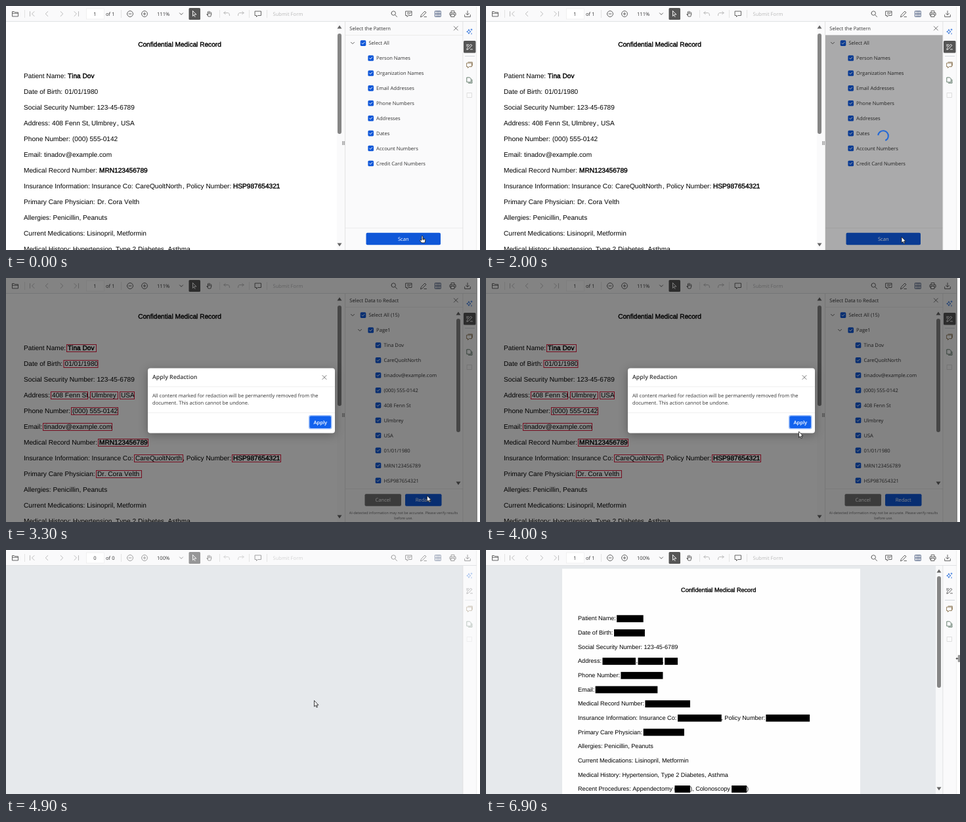
Animation, 722 px wide and 372 px high, one loop 7.8 s. Source, as an HTML page:

```html
<!DOCTYPE html>
<html lang="en">
<head>
<meta charset="utf-8">
<title>Smart redaction</title>
<style>
  html, body { margin: 0; width: 100%; height: 100%; overflow: hidden; background: #fff; }
  svg { display: block; }
  text { font-family: "Open Sans", "Noto Sans", sans-serif; font-size: 7.6px; fill: #333; text-rendering: geometricPrecision; }
  .doc text { font-family: "Liberation Sans", Arial, sans-serif; font-size: 10.15px; font-kerning: none; fill: #000; }
  .doc .bold { stroke: #000; stroke-width: .4; }
  .icon { fill: none; stroke-width: .9; stroke-linecap: round; stroke-linejoin: round; }
  #dialog { filter: drop-shadow(0 3px 7px rgba(0, 0, 0, .3)); }
</style>
</head>
<body>
<svg id="stage" width="722" height="372" viewBox="0 0 722 372"></svg>
<script>
const LOOP = 7800, STEP = 100;
const BLUE = '#0f57d8', RED = '#e0193c', INK = '#555', PALE = '#b4b4b4';
const person = 'Tina Dov', email = 'tinadov@example.com', phone = '(000) 555-0142';
const street = '408 Fenn St', town = 'Ulmbrey', insurer = 'CareQuoltNorth', doctor = 'Dr. Cora Velth';
const birth = '01/01/1980', record = 'MRN123456789', policy = 'HSP987654321';

// Drawing helpers
const rect = (x, y, w, h, fill, extra = '') => `<rect x="${x}" y="${y}" width="${w}" height="${h}" fill="${fill}" ${extra}/>`;
const text = (x, y, s, extra = '') => `<text x="${x}" y="${y}" ${extra}>${s}</text>`;
const path = (d, fill, extra = '') => `<path d="${d}" fill="${fill}" ${extra}/>`;
const icon = (x, y, d, color = INK) => `<path class="icon" transform="translate(${x} ${y})" d="${d}" stroke="${color}"/>`;
const group = (id, body, extra = '') => `<g id="${id}" ${extra}>${body}</g>`;
const line = (x, y, w, h, color = '#dedede') => rect(x, y, w, h, color);
const chevron = (x, y, color = INK) => icon(x, y, 'M-2.5 -1.2L0 1.3 2.5 -1.2', color);
const close = (x, y) => icon(x, y, 'M-3 -3L3 3M3 -3L-3 3', '#666');

const checkRow = (x, y, label) =>
  rect(x - 4.3, y - 4.3, 8.6, 8.6, BLUE, 'rx="1.6"') +
  icon(x, y, 'M-2 0L-.6 1.5 2.1 -1.5', '#fff') +
  text(x + 8.4, y + 2.8, label);

const button = (x, y, w, h, fill, label) =>
  rect(x, y, w, h, fill, 'rx="2"') +
  text(x + w / 2, y + h / 2 + 2.8, label, 'text-anchor="middle" style="fill:#fff"');

const scrollbar = (x, top, bottom, thumbTop, thumbBottom) =>
  path(`M${x - 3.5} ${top + 2.5}h7l-3.5 -5z`, '#666') +
  path(`M${x - 3.5} ${bottom - 2.5}h7l-3.5 5z`, '#666') +
  rect(x - 3, thumbTop, 6, thumbBottom - thumbTop, '#858585', 'rx="3"');

// Document lines: [x, text, width of the sensitive box, bold]
const lines = [
  [[27, 'Patient Name:'], [94, person, 45, 1]],
  [[27, 'Date of Birth:'], [89.5, birth, 52]],
  [[27, 'Social Security Number: 123-45-6789']],
  [[27, 'Address:'], [70, street, 56], [125.1, ','], [130, town, 42], [169, ','], [175, 'USA', 22]],
  [[27, 'Phone Number:'], [101, phone, 71]],
  [[27, 'Email:'], [58, email, 105]],
  [[27, 'Medical Record Number:'], [142, record, 76, 1]],
  [[27, 'Insurance Information: Insurance Co:'], [197, insurer, 74], [269, ', Policy Number:'], [346, policy, 74, 1]],
  [[27, 'Primary Care Physician:'], [139, doctor, 69]],
  [[27, 'Allergies: Penicillin, Peanuts']],
  [[27, 'Current Medications: Lisinopril, Metformin']],
  [[27, 'Medical History: Hypertension, Type 2 Diabetes, Asthma']],
  [[27, 'Recent Procedures: Appendectomy ('], [192, '', 26], [216.6, '), Colonoscopy ('], [288, '', 25.5], [312, ')']]
];
const baseline = row => 110 + 24 * row;
const eachPart = draw => lines.map((parts, row) => parts.map(p => draw(p, baseline(row))).join('')).join('');

const record111 = redacted =>
  text(264.5, 62, 'Confidential Medical Record', 'class="bold" text-anchor="middle"') +
  eachPart(([x, s, w, bold], y) => redacted && w
    ? rect(x - 1.5, y - 9, w, 12, '#000')
    : text(x, y, s, bold ? 'class="bold"' : ''));

const outlines = eachPart(([x, , w], y) => w ? rect(x - 1.5, y - 8.5, w, 11, 'none', `stroke="${RED}"`) : '');
const partial = path('M93 110.5v2h3M88 125.5h8M104 125.5h8M128.5 177v7.5h15M195.5 177v7.5h-4M111 197.5h49' +
  'M112 208.5h48M57 224v-2.5h6M112 221.5h48M192 256.5h25M224 269.5h46', 'none', `stroke="${RED}"`);

// Toolbar
const circle = 'M-4.5 0a4.5 4.5 0 1 0 9 0a4.5 4.5 0 1 0 -9 0M-2 0H2';
const bubble = 'M-4.5 -4h9v6.5h-5l-2 2v-2h-2z';
const hand = 'M-3.5 .5L-2 2V-3M-2 -3V0M-.3 0V-4M1.4 0V-3.3M3.2 .5V-2M-3.5 .5L-1.5 4H2.3L3.2 .5';
const pen = 'M-4.5 4.5l1 -3L2 -4l2 2L-1.5 3.5zM1 4.5h3.5';
const undo = 'M-4 -1.5H2.5q2 0 2 4M-4 -1.5l2.2 -2.2M-4 -1.5l2.2 2.2';
const redo = 'M4 -1.5H-2.5q-2 0 -2 4M4 -1.5l-2.2 -2.2M4 -1.5l-2.2 2.2';
const toolbar =
  rect(0, 1, 717, 22, '#fafafb') + line(0, 23, 717, 1, '#e0e2e4') +
  icon(14, 12, 'M-4.5 3.5v-7h3l1.3 1.3h4.7v5.7zM-4.5 -.8h9') +
  [28, 175, 325, 370, 397].map(x => line(x, 6, .8, 12)).join('') +
  icon(40, 12, 'M-3.5 -3.5v7M3 -3.5L-.5 0 3 3.5', PALE) +
  icon(62, 12, 'M1.8 -3.5L-1.8 0 1.8 3.5', PALE) +
  icon(85, 12, 'M-1.8 -3.5L1.8 0 -1.8 3.5', PALE) +
  icon(107, 12, 'M3.5 -3.5v7M-3 -3.5L.5 0 -3 3.5', PALE) +
  rect(122.5, 4, 27, 16, '#fff', 'stroke="#ececec" stroke-width=".7"') +
  text(135.5, 14.8, '1', 'id="page" text-anchor="middle"') +
  text(152, 14.8, 'of 1', 'id="count"') + text(230, 14.8, '111%', 'id="zoom"') +
  group('tools',
    icon(189, 12, circle) + icon(211, 12, circle + 'M0 -2V2') + chevron(267, 12) +
    rect(278.5, 3, 17.5, 18, '#555', 'rx="1.5"') +
    icon(287, 12, 'M-2.5 -4.5V3.5L-.6 1.7 1 4.5 M-2.5 -4.5L3 1H-.4', '#fff') +
    icon(309.5, 12, hand) + icon(336, 12, undo, PALE) + icon(358, 12, redo, PALE) + icon(384, 12, bubble) +
    text(406.5, 14.8, 'Submit Form', 'style="fill:#bbb"') +
    icon(591, 12, 'M-4 -1a3.2 3.2 0 1 0 6.4 0a3.2 3.2 0 1 0 -6.4 0M1.6 1.5L4.5 4.5') +
    icon(613.5, 12, bubble + 'M-2 -2h3M-2 0h1.5M0 1L4 -3') + icon(636, 12, pen) +
    icon(658, 12, 'M-4.2 -4.2h8.4v8.4h-8.4zM-1.4 -4.2v8.4M1.4 -4.2v8.4M-4.2 0h8.4', '#46597c') +
    icon(680.5, 12, 'M-2.5 -1.5v-3h5v3M-2.5 2h-2v-3.5h9V2h-2M-2.5 .5h5v4h-5z') +
    icon(703, 12, 'M0 -4.5V1.5M-2.5 -.8L0 1.7 2.5 -.8M-4.3 1.5v3h8.6v-3'));

// Side strip
const redactPen = 'M-4 4.3l.6 -2.4L2 -3.7l1.8 1.8L-1.6 3.6zM-4.5 -3h3.5M-4.5 -1h2M1.5 4h3';
const sidebar =
  rect(696, 24, 21, 348, '#fafafb') + line(695.5, 24, .8, 348) + line(716.5, 1, .7, 371, '#e6e6e6') +
  group('strip',
    icon(706, 39, 'M-1 -3q.5 3 3 3.2q-2.5 .2 -3 3.3q-.5 -3.1 -3.3 -3.3q2.8 -.2 3.3 -3.2zM3 -4v2M2 -3h2M3 2.5v1.5', '#2a6fdb') +
    icon(706, 62, redactPen) + line(699, 76, 15, .9, '#cfd3d8') +
    icon(706, 90, 'M-4 -3h7.5v5.5h-4l-2 2v-2h-1.5zM-2 -4.3h6.3v5', '#8a7350') +
    icon(706, 113, 'M-3.8 -4h4.2l2 2v5h-6.2zM-1.5 4.5h5.5v-5', '#55705f') +
    icon(706, 136, 'M-3.5 -3.5h7v7h-7z', '#dcdcdc')) +
  group('selected', rect(697, 53, 18.5, 18.5, '#555', 'rx="1.5"') + icon(706, 62, redactPen, '#fff'));

// Side panel
const rowY = i => 56.6 + 22.92 * i;
const panel = (title, body) =>
  rect(504, 24, 192, 348, '#fafafb') + line(516.2, 24, .8, 348) +
  line(512.4, 206, 1, 6, '#777') + line(514.6, 206, 1, 6, '#777') +
  text(523.3, 36.8, title) + close(685.3, 34) + line(517, 44, 179, .7, '#e6e6e6') +
  scrollbar(508, 32, 364, 42, 195) + chevron(528, 56.5) + body;

const patterns = ['Person Names', 'Organization Names', 'Email Addresses', 'Phone Numbers', 'Addresses', 'Dates',
  'Account Numbers', 'Credit Card Numbers'];
const scanPanel = panel('Select the Pattern',
  checkRow(544, rowY(0), 'Select All') + patterns.map((s, i) => checkRow(555.7, rowY(i + 1), s)).join('') +
  line(517, 338, 179, .7, '#e9e9e9') + button(548.5, 345.7, 113.5, 18.5, BLUE, 'Scan'));

const found = [person, insurer, email, phone, street, town, 'USA', birth, record, policy];
const dataPanel = panel('Select Data to Redact',
  checkRow(544, rowY(0), 'Select All (15)') + chevron(539, rowY(1)) + checkRow(555.7, rowY(1), 'Page1') +
  found.map((s, i) => checkRow(567, rowY(i + 2), s)).join('') + scrollbar(689, 54, 313, 62, 235) +
  line(517, 321, 179, .7, '#e6e6e6') +
  button(546.5, 329.3, 55.5, 18.5, '#717171', 'Cancel') + button(608, 329.3, 55.5, 18.5, BLUE, 'Redact') +
  ['AI-detected information may not be accurate. Please verify results', 'before use.'].map((s, i) =>
    text(605.5, 360 + 8 * i, s, 'text-anchor="middle" style="font-size:5.42px;fill:#666"')).join(''));

const dialog =
  rect(216, 137.5, 285, 99, '#fff', 'rx="4"') +
  text(223, 154.3, 'Apply Redaction', 'style="font-size:8.75px;font-weight:600"') + close(485, 151.5) +
  line(216, 165.5, 285, .7, '#e8e8e8') + line(216, 205, 285, .7, '#e8e8e8') +
  text(223, 181.5, 'All content marked for redaction will be permanently removed from the') +
  text(223, 193.3, 'document. This action cannot be undone.') +
  rect(461, 209, 35.5, 21.5, '#9fc0fb', 'rx="3"') +
  button(462.5, 210.5, 32.5, 18.5, '#1162ee', '<tspan font-weight="600">Apply</tspan>');

const spinner = (id, r, width, arc, color) =>
  `<circle id="${id}" r="${r}" fill="none" stroke="${color}" stroke-width="${width}" pathLength="100" stroke-dasharray="${arc} ${100 - arc}"/>`;

const pointers =
  group('arrow', path('M0 0V9.2L2.1 7.3 3.6 10.5 5 9.9 3.6 6.8H6.4Z', '#fff', 'stroke="#111" stroke-width=".8"')) +
  group('finger', path('M-1 1Q0 -.5 1 1V4.5L4 5.2Q5 5.6 4.8 7L4 11H-1L-3.8 7.2Q-3.6 5.8 -1 7.3Z', '#fff',
    'stroke="#111" stroke-width=".8"') + icon(0, 0, 'M1 4.5V6.5M2.6 5V6.7', '#111')) +
  group('resize', icon(720, 165.5, 'M-.3 -5V5M1.7 -5V5M-1 0H-3.5M-2.4 -1.5L-3.8 0 -2.4 1.5', '#333'));

document.getElementById('stage').innerHTML =
  rect(0, 0, 722, 372, '#fff') +
  group('before', group('text', record111(false), 'class="doc"') + group('partial', partial) + group('outlines', outlines)) +
  group('backdrop', rect(0, 24, 696, 348, '#e6e9ec')) +
  group('after', rect(116, 28.5, 454, 344, '#fefefe') +
    group('result', record111(true), 'class="doc" transform="translate(115.65 8.2) scale(.902)"') +
    rect(685, 24, 11, 348, '#f7f8f9') + scrollbar(690, 32, 364, 40, 210)) +
  group('scan', scanPanel) + group('data', dataPanel) + toolbar + sidebar +
  group('scanning', rect(517, 44.5, 178.5, 328, '#000', 'opacity=".32"') + spinner('scanSpin', 7.8, 2.1, 66, '#2469d6')) +
  rect(0, 0, 718, 372, '#000', 'id="veil"') + group('dialog', dialog) +
  group('applying', rect(608.5, 329.8, 54.5, 17.5, '#2a66d4', 'rx="2" stroke="#8facdf" fill-opacity=".7"') +
    text(635.8, 341.4, 'Redact', 'text-anchor="middle" style="fill:#bccbea"') + spinner('applySpin', 12.2, 3.2, 78, '#1464f0')) +
  pointers;

const $ = id => document.getElementById(id);
const show = (id, on) => $(id).style.display = on ? '' : 'none';
const spin = (id, x, y, angle) => $(id).setAttribute('transform', `translate(${x} ${y}) rotate(${angle})`);

// Pointer track: [time, x, y]
const track = [[0, 634, 350], [300, 634, 350], [400, 633, 352], [2100, 633, 352], [2600, 654.5, 339.5], [3200, 654.5, 339.5],
  [3800, 476.5, 234], [4000, 476.5, 234], [4200, 476.5, 218], [4700, 476.5, 218], [4900, 469.5, 229.5],
  [6100, 469.5, 229.5], [6400, 720, 162], [LOOP, 720, 162]];

function pointerAt(t) {
  const i = track.findIndex(k => k[0] > t);
  const [t0, x0, y0] = track[i - 1], [t1, x1, y1] = track[i];
  const u = (t - t0) / (t1 - t0), e = u * u * (3 - 2 * u);
  return [x0 + (x1 - x0) * e, y0 + (y1 - y0) * e];
}

function render(t) {
  const within = (a, b) => t >= a && t < b;
  const scanning = within(400, 2100), asking = within(3300, 4200), applying = within(4200, 4800);
  const empty = within(4800, 5200), done = t >= 5200, open = t < 4800;

  show('before', open);
  show('partial', within(2400, 3300));
  show('outlines', t >= 3300);
  show('backdrop', !open);
  show('after', done);
  show('scan', t < 2100);
  show('data', within(2100, 4800));
  show('scanning', scanning);
  show('dialog', asking);
  show('applying', applying);
  show('selected', open);
  show('veil', asking || applying);
  $('veil').setAttribute('opacity', asking ? .48 : .35);
  $('tools').setAttribute('opacity', empty ? .6 : 1);
  $('strip').setAttribute('opacity', empty ? .4 : 1);
  $('page').textContent = empty ? '0' : '1';
  $('count').textContent = empty ? 'of 0' : 'of 1';
  $('zoom').textContent = open ? '111%' : '100%';
  spin('scanSpin', 605, 198, 151 + (t - 900) * .36);
  spin('applySpin', 358.5, 187, 268 + (t - 4300) * .36);

  const pressing = t < 400 || within(2500, 3300);
  const [x, y] = pointerAt(t);
  show('finger', pressing);
  show('arrow', !pressing && t < 6400);
  show('resize', t >= 6400);
  for (const id of ['finger', 'arrow']) $(id).setAttribute('transform', `translate(${x} ${y})`);
}

const start = performance.now();
function tick() {
  const t = (performance.now() - start) % LOOP;
  render(Math.floor(t / STEP) * STEP);
  requestAnimationFrame(tick);
}
tick();
</script>
</body>
</html>
```
